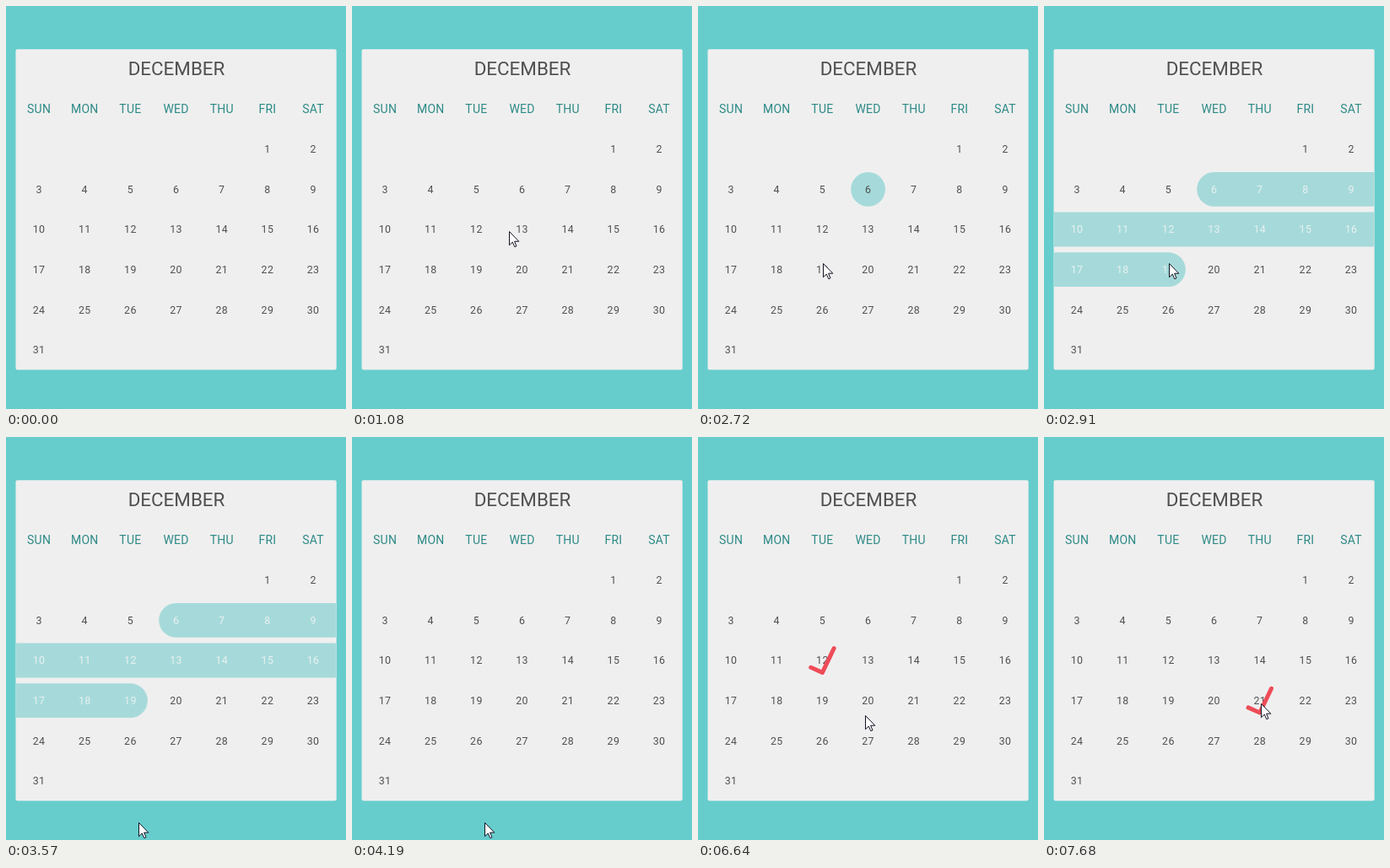
These frames come from a looping animation (403 by 478 pixels, 8 s). An HTML page:

```html
<!DOCTYPE html>
<html lang="en">
<head>
<meta charset="utf-8">
<title>Calendar</title>
<style>
  html, body { margin: 0; width: 100%; height: 100%; overflow: hidden; background: #66cdcc; }
  svg { display: block; width: 403px; height: 478px; }
  text { font-family: Roboto, sans-serif; text-anchor: middle; fill: #505050; }
  .title { font-size: 22.4px; }
  .week { font-size: 14px; letter-spacing: .25px; fill: #2d8a87; }
  .day { font-size: 12.4px; letter-spacing: .4px; }
  .day.lit { fill: #eaf0f0; }
  .mark { fill: #a6dada; }
  .check { fill: none; stroke: #ee4c58; stroke-width: 5; stroke-linecap: round; stroke-linejoin: round; }
</style>
</head>
<body>
<svg viewBox="0 0 403 478">
  <rect width="403" height="478" fill="#66cdcc"/>
  <rect x="11.5" y="51.2" width="380.2" height="380.2" rx="2" fill="#efefef"/>
  <circle id="dot" class="mark" r="20.4"/>
  <g id="range" class="mark"></g>
  <text class="title" x="202" y="82.3">DECEMBER</text>
  <g id="grid"></g>
  <path id="check" class="check" d="M-13.7 8.3L0 14.4L13.7 -14.3"/>
  <path id="cursor" d="M.5 .5V16.7L4.3 13.1L6.8 18.7L9 17.8L6.6 12.2H11.8Z" fill="#fff" stroke="#111122"/>
</svg>
<script>
const LOOP = 8000, FIRST = 5, R = 20.4;
const $ = id => document.getElementById(id);
const colX = c => 39.1 + c * 54.17;
const rowY = r => 122.2 + r * 47.6;
const cell = day => {
  const i = day - 1 + FIRST;
  return [colX(i % 7), rowY(1 + Math.floor(i / 7))];
};

function add(parent, tag, attrs, text = '') {
  const el = document.createElementNS('http://www.w3.org/2000/svg', tag);
  for (const k in attrs) el.setAttribute(k, attrs[k]);
  el.textContent = text;
  parent.appendChild(el);
  return el;
}

'SUN MON TUE WED THU FRI SAT'.split(' ').forEach((name, c) =>
  add($('grid'), 'text', { class: 'week', x: colX(c), y: rowY(0) + 5 }, name));

const days = [];
for (let d = 1; d <= 31; d++) {
  const [x, y] = cell(d);
  days.push(add($('grid'), 'text', { class: 'day', x, y: y + 4.4 }, d));
}

// Selected span from the 6th to the 19th
const band = d => add($('range'), 'path', { d });
const [sx, sy] = cell(6), [ex, ey] = cell(19);
band(`M391.5 ${sy - R}H${sx}a${R} ${R} 0 0 0 0 ${2 * R}H391.5Z`);
band(`M11.7 ${rowY(3) - R}H391.5v${2 * R}H11.7Z`);
band(`M11.7 ${ey - R}H${ex}a${R} ${R} 0 0 1 0 ${2 * R}H11.7Z`);
$('dot').setAttribute('cx', sx);
$('dot').setAttribute('cy', sy);

const easeOut = p => 1 - (1 - p) ** 2;
const easeBoth = p => p * p * (3 - 2 * p);

// lead: 1 when the first step already moves the pointer
const moves = [
  { from: 680, to: 1380, steps: 13, lead: 0, ease: easeOut, pts: [[135, 450], [152, 372], [184, 280], [202, 213]] },
  { from: 2190, to: 2720, steps: 10, lead: 0, ease: easeBoth, pts: [[202, 213], [188, 246], [164, 278], [148, 305]] },
  { from: 2910, to: 3570, steps: 12, lead: 0, ease: easeBoth, pts: [[148, 305], [150, 356], [154, 406], [157, 457]] },
  { from: 4440, to: 5040, steps: 11, lead: 1, ease: easeBoth, pts: [[157, 457], [166, 392], [165, 328], [152, 263]] },
  { from: 6280, to: 7060, steps: 14, lead: 1, ease: easeBoth, pts: [[152, 263], [178, 370], [214, 317], [257, 316]] }
];

function bezier([a, b, c, d], s) {
  const q = 1 - s;
  return [0, 1].map(i =>
    q * q * q * a[i] + 3 * q * q * s * b[i] + 3 * q * s * s * c[i] + s * s * s * d[i]);
}

function pointer(t) {
  const m = moves.filter(v => t >= v.from).pop();
  if (!m) return null;
  const last = m.steps - 1;
  const u = Math.min(1, (t - m.from) / (m.to - m.from));
  const step = Math.floor(u * last + 0.01);
  return bezier(m.pts, m.ease((step + m.lead) / (last + m.lead)));
}

const show = (el, on) => el.setAttribute('visibility', on ? 'visible' : 'hidden');
const moveTo = (el, [x, y]) => el.setAttribute('transform', `translate(${x} ${y})`);

function draw(t) {
  const ranged = t >= 2910 && t < 4190;
  show($('dot'), t >= 2190 && t < 2910);
  show($('range'), ranged);
  days.forEach((el, i) => el.classList.toggle('lit', ranged && i >= 5 && i <= 18));

  show($('check'), t >= 5720);
  moveTo($('check'), cell(t < 7680 ? 12 : 21));

  const p = pointer(t);
  show($('cursor'), p);
  if (p) moveTo($('cursor'), p.map(Math.round));
}

const start = performance.now();
function tick() {
  draw((performance.now() - start) % LOOP);
  requestAnimationFrame(tick);
}
draw(0);
requestAnimationFrame(tick);
</script>
</body>
</html>
```
